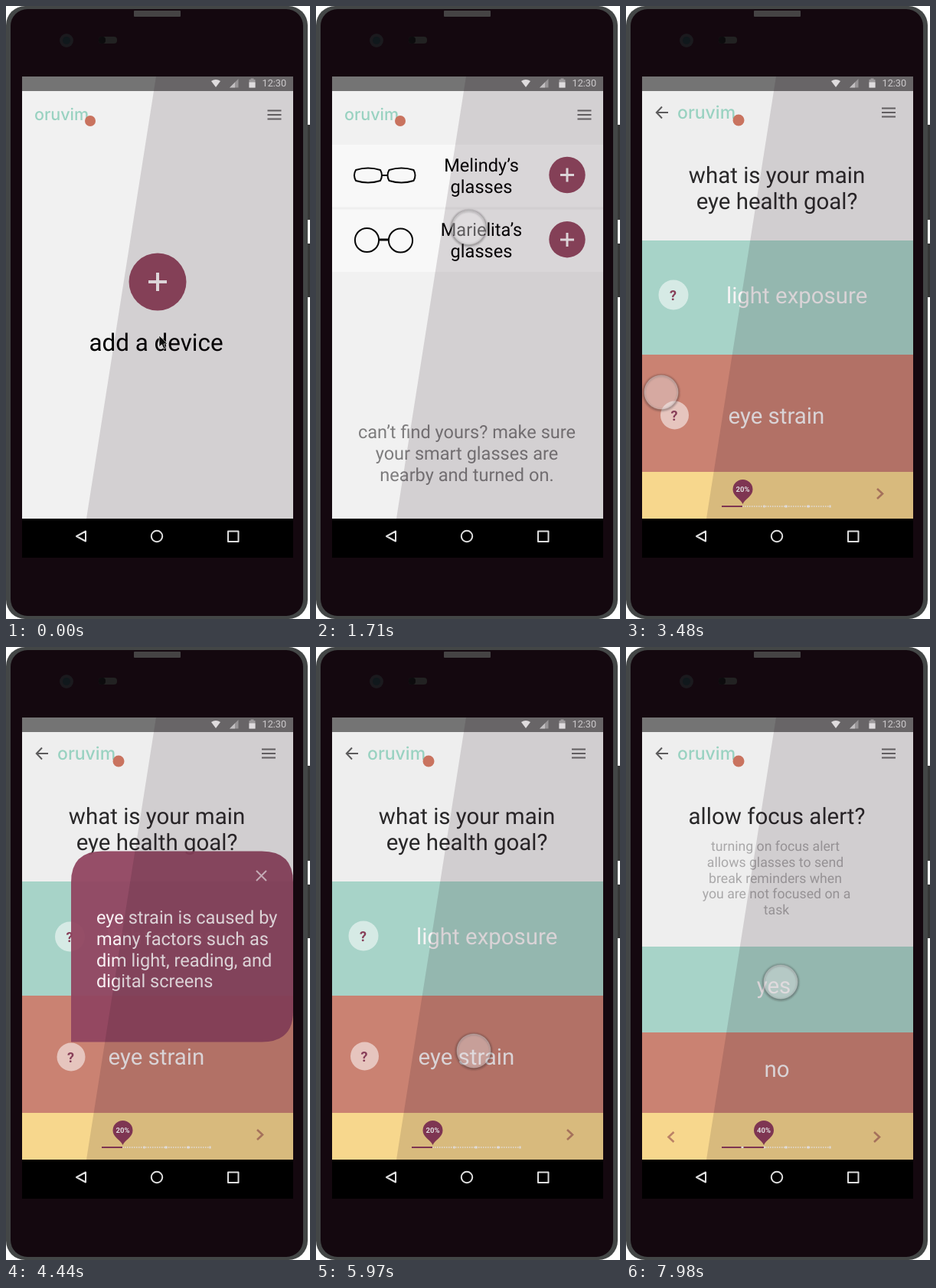
These frames come from a looping animation (397x800 px, 8 s). An HTML page:

```html
<!DOCTYPE html>
<html lang="en">
<head>
<meta charset="utf-8">
<title>Smart glasses setup</title>
<style>
  html, body { margin: 0; width: 100%; height: 100%; overflow: hidden; background: #fff; }
  svg { display: block; width: 100%; height: 100%; }
  text { font-family: Roboto, sans-serif; font-size: 23.57px; text-rendering: geometricPrecision; }
  .title { font-size: 29.46px; fill: #292829; }
  .choice { font-size: 29.46px; fill: #f8f4f5; }
  .note { font-size: 17.68px; fill: #a9a8a9; text-anchor: middle; }
  .brand { font-family: Inter, sans-serif; font-weight: 500; fill: #99d2c1; }
  .mid { text-anchor: middle; }
  .mark { font-size: 18px; font-weight: 700; fill: #873e58; text-anchor: middle; }
  .percent { font-size: 9.5px; font-weight: 700; fill: #fff; text-anchor: middle; }
  .line { fill: none; stroke-width: 2; }
  .chevron { fill: none; stroke: #bb8266; stroke-width: 2.6; }
  .track { stroke: #8d3c5b; stroke-width: 2; }
</style>
</head>
<body>
<svg viewBox="0 0 397 800">
  <defs>
    <clipPath id="screen"><rect x="21" y="92" width="354" height="628"/></clipPath>
    <filter id="soft" x="-30%" y="-30%" width="160%" height="160%"><feGaussianBlur stdDeviation="1.3"/></filter>
    <path id="menu" class="line" stroke="#6b6a6b" d="M-9-5.5H9M-9 0H9M-9 5.5H9"/>
    <path id="plus" d="M-12 0H12M0-12V12" stroke="#fbf6f8" stroke-width="4"/>
    <g id="home-header">
      <text class="brand" x="37" y="149" style="font-size:21.5px">oruvim</text>
      <circle cx="110" cy="150" r="7" fill="#c9735f"/>
      <use href="#menu" x="350.5" y="142"/>
    </g>
    <g id="header">
      <path class="line" stroke="#5c5b5c" d="M55 139H40M47 131.5L39.8 139 47 146.5"/>
      <text class="brand" x="67" y="147" style="font-size:23px">oruvim</text>
      <circle cx="147" cy="149" r="7.5" fill="#c9735f"/>
      <use href="#menu" x="343" y="139"/>
    </g>
    <path id="pin" d="M0 650C-3 643-13 640-13 631A13 13 0 0 1 13 631C13 640 3 643 0 650Z" fill="#8d3c5b"/>
    <g id="footer">
      <rect x="21" y="608" width="354" height="61" fill="#f7d78d"/>
      <path d="M125 653H267" stroke="#fff6df" stroke-width="2" stroke-dasharray="1.5 1.5"/>
      <path d="M179.5 653h2m26 0h3m26 0h3m26 0h2" stroke="#fff" stroke-width="3"/>
    </g>
    <path id="lens" d="M-16-7Q0-12 16-7 20 0 16 7 0 12-16 7-20 0-16-7Z"/>
  </defs>

  <!-- phone -->
  <path d="M393 155h4v124h-4zM393 310h4v70h-4z" fill="#353636"/>
  <rect width="394" height="800" rx="25" fill="#434646"/>
  <rect x="6" y="4" width="382" height="792" rx="22" fill="#14080f"/>
  <rect x="167" y="6" width="61" height="8" rx="1" fill="#454344"/>
  <circle cx="79" cy="45" r="9" fill="#1b1a1e"/>
  <circle cx="79" cy="45" r="5" fill="#10181c"/>
  <rect x="121" y="40" width="24" height="9" rx="4" fill="#222"/>
  <rect x="121" y="40" width="9" height="9" rx="4" fill="#0c0b0d"/>

  <g clip-path="url(#screen)">
    <rect x="21" y="92" width="354" height="577" fill="#f1f1f1"/>

    <g id="add">
      <use href="#home-header"/>
      <circle cx="198" cy="360" r="37.5" fill="#954961"/>
      <use href="#plus" x="198" y="360"/>
      <text class="mid" x="196" y="450" style="font-size:31.4px">add a device</text>
    </g>

    <g id="list">
      <rect x="21" y="111" width="354" height="558" fill="#f1f1f1"/>
      <use href="#home-header"/>
      <rect x="21" y="181" width="354" height="166" fill="#f8f8f8"/>
      <path d="M21 264H375" stroke="#efefef" stroke-width="3"/>
      <g fill="none" stroke="#080808" stroke-width="2">
        <use href="#lens" x="68" y="221"/><use href="#lens" x="111.5" y="221"/>
        <path d="M86 221H93.500"/>
        <circle cx="66.500" cy="305.500" r="15.600"/><circle cx="110.500" cy="306" r="15.600"/>
        <path d="M82 305H95" stroke-width="3"/>
      </g>
      <g class="mid">
        <text x="216" y="216">Melindy’s</text><text x="216" y="243.5">glasses</text>
        <text x="216" y="300">Marielita’s</text><text x="216" y="328">glasses</text>
      </g>
      <g fill="#954961"><circle cx="328" cy="220.5" r="23.7"/><circle cx="328" cy="304.7" r="23.7"/></g>
      <use href="#plus" transform="translate(328 220.5) scale(.75)"/>
      <use href="#plus" transform="translate(328 305) scale(.75)"/>
      <g class="mid" fill="#7e7d7e">
        <text x="197" y="564">can’t find yours? make sure</text>
        <text x="197" y="592">your smart glasses are</text>
        <text x="197" y="620">nearby and turned on.</text>
      </g>
    </g>

    <g id="goal">
      <rect x="21" y="111" width="354" height="558" fill="#eee"/>
      <use href="#header"/>
      <text class="title mid" x="197" y="231">what is your main</text>
      <text class="title mid" x="197" y="265">eye health goal?</text>
      <rect x="21" y="306" width="354" height="149" fill="#a7d3c8"/>
      <rect x="21" y="455" width="354" height="153" fill="#ca8272"/>
      <text class="choice" x="131" y="388">light exposure</text>
      <text class="choice" x="133.5" y="545">eye strain</text>
      <g id="marks">
        <g fill="#fff" fill-opacity=".54"><circle cx="62" cy="377" r="19.5"/><circle cx="63.5" cy="534" r="18.5"/></g>
        <text class="mark" x="61.5" y="384">?</text><text class="mark" x="63" y="541">?</text>
      </g>
      <use href="#footer"/>
      <path class="track" d="M125 653H152"/>
      <use href="#pin" x="152.5"/><text class="percent" x="152.5" y="634">20%</text>
      <path class="chevron" d="M328 630L335 636.5 328 643"/>
      <g id="popup">
        <path d="M85 515.5V307Q85 266.5 126 266.5H334Q375 266.500 375 307V475Q375 515.500 334 515.500Z" fill="#914560" fill-opacity=".94"/>
        <path d="M327 292l13 13m0-13l-13 13" class="line" stroke="#dfc4ce"/>
        <g fill="#fbf3f6">
          <text x="118" y="361">eye strain is caused by</text>
          <text x="118" y="389">many factors such as</text>
          <text x="118" y="416.5">dim light, reading, and</text>
          <text x="118" y="444">digital screens</text>
        </g>
      </g>
    </g>

    <g id="alert">
      <rect x="21" y="111" width="354" height="558" fill="#eee"/>
      <use href="#header"/>
      <text class="title mid" x="197" y="231">allow focus alert?</text>
      <text class="note" x="195" y="266">turning on focus alert</text>
      <text class="note" x="195" y="287">allows glasses to send</text>
      <text class="note" x="195" y="307.5">break reminders when</text>
      <text class="note" x="196.5" y="328">you are not focused on a</text>
      <text class="note" x="196.5" y="348.5">task</text>
      <rect x="21" y="391" width="354" height="112" fill="#a7d3c8"/>
      <rect x="21" y="503" width="354" height="105" fill="#ca8272"/>
      <text class="choice mid" x="193" y="452">yes</text>
      <text class="choice mid" x="197" y="561">no</text>
      <use href="#footer"/>
      <path class="track" d="M125 653H180"/>
      <path d="M150.5 653h3" stroke="#fff" stroke-width="2"/>
      <use href="#pin" x="180"/><text class="percent" x="180" y="634">40%</text>
      <path class="chevron" d="M324 633L331 639.5 324 646M62.5 633L55.5 639.5 62.5 646"/>
    </g>

    <!-- status bar -->
    <rect x="21" y="92" width="354" height="19" fill="#747474"/>
    <g fill="#fff">
      <path d="M268 98Q274 94 280 98L274 106Z"/>
      <path d="M292 106.5L303.5 95V106.5Z" opacity=".4"/><path d="M292 106.5L299 99.5V106.5Z" opacity=".6"/>
      <path d="M317.5 96H319.5V94.5H323.5V96H325.5V106.5H317.5Z" opacity=".45"/>
      <path d="M317.5 99.5H325.5V106.5H317.5Z"/>
      <text x="334.5" y="105" style="font-size:12.7px" opacity=".85">12:30</text>
    </g>

    <!-- glass reflection edge -->
    <path d="M196 92H375V669H105Z" fill="#23141e" fill-opacity=".145"/>

    <rect x="21" y="669" width="354" height="51" fill="#000"/>
    <g class="line" stroke="#dedede" stroke-linejoin="round">
      <path d="M104 685.5V698.5L92 692ZM290 685.5H303.5V699H290Z"/>
      <circle cx="197" cy="692" r="7.2"/>
    </g>

    <g id="touch">
      <circle cy=".8" r="22.5" fill="none" stroke="#2a2528" stroke-opacity=".38" stroke-width="3" filter="url(#soft)"/>
      <circle r="22" fill="#e6e4e5" fill-opacity=".4" stroke="#efedee" stroke-opacity=".3"/>
    </g>
    <path id="arrow" d="M0 0V15L3.5 11.8 6 17.5 8.5 16.4 6 11H11Z" fill="#111" stroke="#eee" stroke-width=".7"/>
  </g>
</svg>
<script>
const LOOP = 8000;
const el = id => document.getElementById(id);
const ease = p => p * p * (3 - 2 * p);
const ramp = (t, start, end) => ease(Math.min(1, Math.max(0, (t - start) / (end - start))));

// Stops are [time, x, y]; equal neighbours make a pause.
const touchPath = [
  [0, 200, 430], [200, 200, 430], [650, 198, 360], [1300, 198, 360],
  [1680, 199.5, 289], [1750, 199.5, 289], [2050, 198, 217], [2930, 198, 217],
  [3480, 46, 504], [3680, 62, 532], [4300, 62, 532], [4650, 333, 298],
  [5650, 333, 298], [5950, 206, 527], [7320, 206, 527], [7850, 202, 437], [LOOP, 202, 437]
];

function positionAt(t) {
  const i = touchPath.findIndex(stop => stop[0] > t);
  const [t0, x0, y0] = touchPath[i - 1], [t1, x1, y1] = touchPath[i];
  const p = ramp(t, t0, t1);
  return [x0 + (x1 - x0) * p, y0 + (y1 - y0) * p];
}

function draw(t) {
  el("list").setAttribute("opacity", ramp(t, 1080, 1250));
  el("goal").setAttribute("opacity", ramp(t, 2150, 2350));
  el("alert").setAttribute("opacity", ramp(t, 6700, 6900));

  const open = ramp(t, 3850, 4150) * (1 - ramp(t, 5300, 5580));
  el("marks").setAttribute("transform", `translate(${21.5 * open} ${open})`);
  el("popup").setAttribute("transform", `translate(85 515) scale(${open}) translate(-85 -515)`);
  el("popup").setAttribute("opacity", Math.min(1, open * 3));

  const [x, y] = positionAt(t);
  const hidden = ramp(t, 3750, 3950) * (1 - ramp(t, 4700, 4850));
  el("touch").setAttribute("transform", `translate(${x} ${y})`);
  el("touch").setAttribute("opacity", t < 100 ? 0 : 1 - hidden);
  el("arrow").setAttribute("transform", `translate(${x} ${y})`);
  el("arrow").setAttribute("opacity", t < 100 ? 1 : 0);
}

const began = performance.now();
function tick() {
  draw((performance.now() - began) % LOOP);
  requestAnimationFrame(tick);
}
tick();
</script>
</body>
</html>
```
